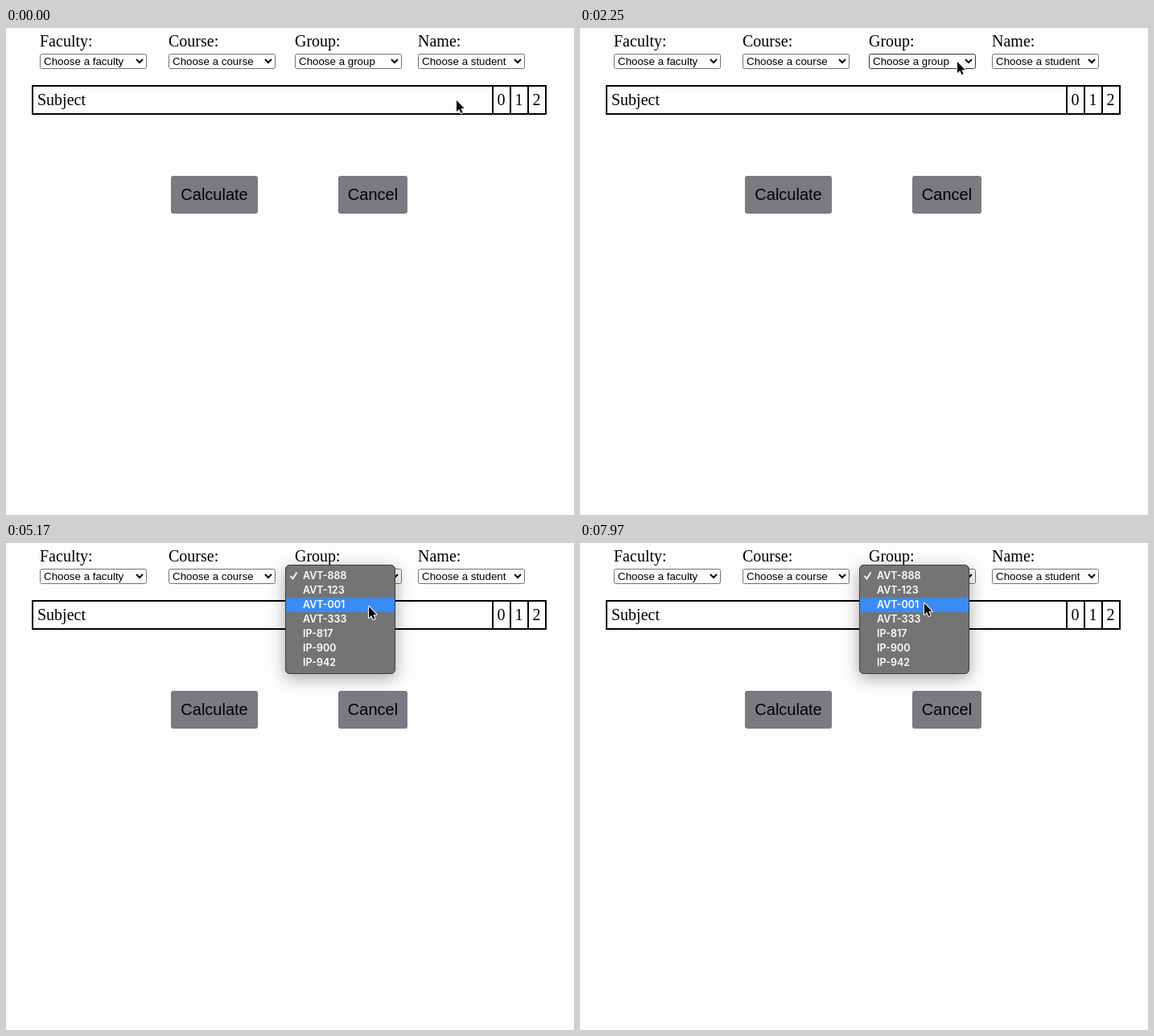
Write an HTML page with a canvas that moves like this. It is 706 px wide and 606 px high and loops after 7.99 s.

```html
<!DOCTYPE html>
<html lang="en">
<head>
<meta charset="utf-8">
<title>Student form</title>
<style>
  html, body { margin: 0; width: 100%; height: 100%; overflow: hidden; background: #fdfdfd; }
  canvas { display: block; }
</style>
</head>
<body>
<canvas id="stage" width="706" height="606"></canvas>
<script>
const ctx = document.getElementById('stage').getContext('2d');
const LOOP = 7990;
const MENU_OPENS = 2590;
const HIGHLIGHT_LAG = 60;
const ROW = 18;
const PAGE = '#fdfdfd';
const SERIF = '20px "Liberation Serif", "Times New Roman", serif';
const SANS = '"Liberation Sans", Arial, sans-serif';

const fields = [
  { x: 42, label: 'Faculty:', text: 'Choose a faculty' },
  { x: 202, label: 'Course:', text: 'Choose a course' },
  { x: 359, label: 'Group:', text: 'Choose a group' },
  { x: 512, label: 'Name:', text: 'Choose a student' }
];
const groups = ['AVT-888', 'AVT-123', 'AVT-001', 'AVT-333', 'IP-817', 'IP-900', 'IP-942'];

// Turning points of the pointer
const stops = [
  { t: 0, x: 559, y: 89 },
  { t: 1250, x: 541, y: 41 },
  { t: 1900, x: 468, y: 41 },
  { t: 3400, x: 467, y: 39 },
  { t: 4500, x: 458, y: 76 },
  { t: 5600, x: 446, y: 79 },
  { t: 6300, x: 438, y: 42 },
  { t: 6850, x: 436, y: 42 },
  { t: 7750, x: 428, y: 75 },
  { t: LOOP, x: 427, y: 74 }
];

const ease = k => k * k * (3 - 2 * k);

function pointerAt(t) {
  const i = Math.max(1, stops.findIndex(s => s.t >= t));
  const a = stops[i - 1];
  const b = stops[i];
  const k = ease((t - a.t) / (b.t - a.t));
  return { x: Math.round(a.x + (b.x - a.x) * k), y: Math.round(a.y + (b.y - a.y) * k) };
}

function text(str, x, y, font, color = '#000') {
  ctx.font = font;
  ctx.fillStyle = color;
  ctx.fillText(str, x, y);
}

function roundRect(x, y, w, h, r) {
  ctx.beginPath();
  ctx.roundRect(x, y, w, h, r);
}

function polyline(points, color, width) {
  ctx.beginPath();
  points.forEach(([x, y]) => ctx.lineTo(x, y));
  ctx.strokeStyle = color;
  ctx.lineWidth = width;
  ctx.stroke();
}

function drawField({ x, label, text: value }, hovered) {
  text(label, x, 23, SERIF);
  roundRect(x + 0.5, 32.5, 132, 18, 2);
  ctx.fillStyle = PAGE;
  ctx.fill();
  ctx.strokeStyle = hovered ? '#333' : '#737373';
  ctx.lineWidth = 1;
  ctx.stroke();
  text(value, x + 5, 46, '13.333px ' + SANS);
  polyline([[x + 120, 39], [x + 124, 43], [x + 128, 39]], '#000', 2);
}

function drawTable() {
  ctx.strokeStyle = '#000';
  ctx.lineWidth = 2;
  ctx.strokeRect(33, 72, 638, 35);
  text('Subject', 39, 96, SERIF);
  for (let i = 0; i < 3; i++) {
    const x = 605 + 22 * i;
    polyline([[x, 72], [x, 107]], '#000', 2);
    text(String(i), x + 5.5, 96, SERIF);
  }
}

function drawButton(label, x, w) {
  roundRect(x, 184, w, 47, 3);
  ctx.fillStyle = '#7a7b80';
  ctx.fill();
  ctx.textAlign = 'center';
  text(label, x + w / 2, 214, '20px ' + SANS);
  ctx.textAlign = 'left';
}

function drawMenu(active) {
  ctx.save();
  ctx.shadowColor = 'rgba(0, 0, 0, 0.35)';
  ctx.shadowBlur = 20;
  ctx.shadowOffsetY = 5;
  roundRect(347, 27, 137, 136, 6);
  ctx.fillStyle = '#747474';
  ctx.fill();
  ctx.restore();

  ctx.fillStyle = '#3b8bf7';
  ctx.fillRect(348, 32 + ROW * active, 135, ROW);
  roundRect(347.5, 27.5, 136, 135, 5.5);
  ctx.strokeStyle = '#3c3c3c';
  ctx.lineWidth = 1;
  ctx.stroke();

  groups.forEach((name, i) => {
    text(name, 369, 45 + ROW * i, '600 12.5px Inter, sans-serif', '#fff');
  });
  polyline([[353.5, 41], [356.5, 44.5], [361.5, 36.5]], '#fff', 1.8);
}

function drawPointer({ x, y }) {
  const shape = [[0, 0], [0, 14], [3.2, 11], [5.5, 16], [7.6, 15], [5.4, 10.2], [9.6, 10]];
  ctx.save();
  ctx.translate(x + 1, y + 1);
  ctx.beginPath();
  shape.forEach(([dx, dy]) => ctx.lineTo(dx, dy));
  ctx.closePath();
  ctx.lineJoin = 'round';
  ctx.strokeStyle = '#fff';
  ctx.lineWidth = 2;
  ctx.stroke();
  ctx.fillStyle = '#000';
  ctx.fill();
  ctx.restore();
}

function draw(t) {
  const pointer = pointerAt(t);
  const open = t >= MENU_OPENS;
  ctx.fillStyle = PAGE;
  ctx.fillRect(0, 0, 706, 606);

  fields.forEach(field => {
    const inside = pointer.x >= field.x && pointer.x < field.x + 133 &&
      pointer.y >= 32 && pointer.y < 51;
    drawField(field, inside && !open);
  });
  drawTable();
  drawButton('Calculate', 205, 108);
  drawButton('Cancel', 413, 86);

  if (open) {
    const row = Math.floor((pointerAt(t - HIGHLIGHT_LAG).y - 32) / ROW);
    drawMenu(row);
  }
  drawPointer(pointer);
}

const start = performance.now();
function tick() {
  draw((performance.now() - start) % LOOP);
  requestAnimationFrame(tick);
}
tick();
</script>
</body>
</html>
```
